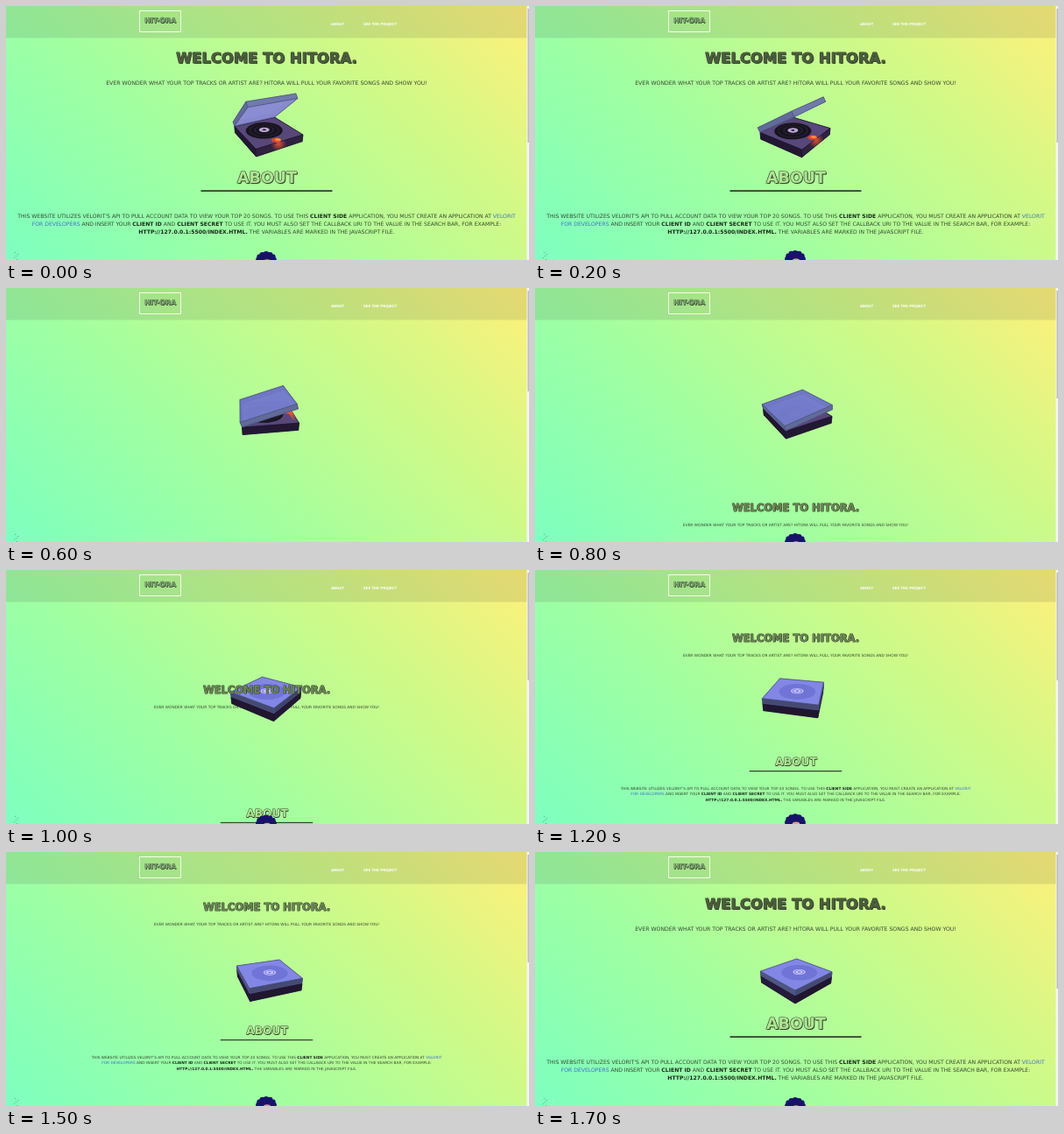
Recreate the animation shown at these times as an HTML page with a canvas. Size 597 px wide and 290 px high, loop 1.8 s.

```html
<!DOCTYPE html>
<html lang="en">
<head>
<meta charset="utf-8">
<title>Hitora</title>
<style>
html, body { margin: 0; width: 100%; height: 100%; overflow: hidden; }
canvas { display: block; }
</style>
</head>
<body>
<canvas id="stage" width="597" height="290"></canvas>
<script>
const ctx = document.getElementById('stage').getContext('2d');
const LOOP = 1800, STEP = 100, MID = 297.5, INK = '#34482f';
const FONT = '"DejaVu Sans", sans-serif';
const HALF = 28.5, BASE_TOP = 0, SIN_PITCH = 0.45, COS_PITCH = 0.89;
const RAD = Math.PI / 180;

const INTRO = 'EVER WONDER WHAT YOUR TOP TRACKS OR ARTIST ARE? HITORA WILL PULL YOUR FAVORITE SONGS AND SHOW YOU!';
// *bold* and _link_ runs
const ABOUT = [
  "THIS WEBSITE UTILIZES VELORIT'S API TO PULL ACCOUNT DATA TO VIEW YOUR TOP 20 SONGS. TO USE THIS *CLIENT SIDE* APPLICATION, YOU MUST CREATE AN APPLICATION AT _VELORIT_",
  '_FOR DEVELOPERS_ AND INSERT YOUR *CLIENT ID* AND *CLIENT SECRET* TO USE IT. YOU MUST ALSO SET THE CALLBACK URI TO THE VALUE IN THE SEARCH BAR, FOR EXAMPLE:',
  '*HTTP://127.0.0.1:5500/INDEX.HTML.* THE VARIABLES ARE MARKED IN THE JAVASCRIPT FILE.'
];

const sky = ctx.createLinearGradient(77, 367, 520, -77);
[[0, '#7dffc0'], [0.35, '#a1ffa1'], [0.7, '#d0f988'], [1, '#fff07a']]
  .forEach(stop => sky.addColorStop(...stop));

function rect(x, y, w, h, fill) {
  ctx.fillStyle = fill;
  ctx.fillRect(x, y, w, h);
}

function richLine(line, y, size) {
  const runs = line.split(/(\*[^*]+\*|_[^_]+_)/).filter(Boolean).map(run => {
    const bold = run[0] === '*', link = run[0] === '_';
    const font = `${bold ? 'bold ' : ''}${size}px ${FONT}`;
    const text = run.replace(/[*_]/g, '');
    ctx.font = font;
    return { text, font, color: link ? '#3f70d0' : bold ? '#1a261a' : INK, width: ctx.measureText(text).width };
  });
  let x = MID - runs.reduce((sum, run) => sum + run.width, 0) / 2;
  ctx.textAlign = 'left';
  for (const run of runs) {
    ctx.font = run.font;
    ctx.fillStyle = run.color;
    ctx.fillText(run.text, x, y);
    x += run.width;
  }
}

function shaded(text, x, y, size, face) {
  const base = y + size * 0.07;
  ctx.font = `bold ${size}px ${FONT}`;
  ctx.textAlign = 'center';
  ctx.lineJoin = 'round';
  ctx.fillStyle = ctx.strokeStyle = '#37432f';
  ctx.lineWidth = size * 0.07;
  ctx.fillText(text, x + size * 0.05, base + size * 0.05);
  ctx.strokeText(text, x, base);
  ctx.fillStyle = face;
  ctx.fillText(text, x, base);
}

function polygon(points, fill, stroke) {
  ctx.beginPath();
  points.forEach(([x, y]) => ctx.lineTo(x, y));
  ctx.closePath();
  ctx.fillStyle = fill;
  ctx.fill();
  if (!stroke) return;
  ctx.strokeStyle = stroke;
  ctx.lineWidth = 0.6;
  ctx.stroke();
}

function turntable(t) {
  const yaw = (150 - 0.114 * t) * RAD;
  const open = Math.max(0, 40 - 0.04 * t) * RAD;

  const project = (x, y, z) => {
    const side = x * Math.cos(yaw) - z * Math.sin(yaw);
    const depth = x * Math.sin(yaw) + z * Math.cos(yaw);
    const near = depth * COS_PITCH + y * SIN_PITCH;
    const k = 190 / (190 - near);
    return [298 + side * k, 142 + (depth * SIN_PITCH - y * COS_PITCH) * k, near];
  };
  // The lid swings about the edge z = HALF.
  const lid = (x, h, z) => {
    const reach = HALF - z;
    return project(x,
      BASE_TOP + reach * Math.sin(open) + h * Math.cos(open),
      HALF - reach * Math.cos(open) + h * Math.sin(open));
  };
  const box = (map, low, high, colors, edge) => {
    const corner = i => map(i & 1 ? HALF : -HALF, i & 2 ? high : low, i & 4 ? HALF : -HALF);
    // bottom, top, then the four sides
    [[0, 1, 5, 4], [2, 3, 7, 6], [0, 1, 3, 2], [4, 5, 7, 6], [0, 2, 6, 4], [1, 3, 7, 5]]
      .map((face, i) => {
        const points = face.map(corner);
        return { points, color: colors[i], near: points.reduce((sum, p) => sum + p[2], 0) };
      })
      .sort((a, b) => a.near - b.near)
      .forEach(face => polygon(face.points, face.color, edge));
  };
  const disc = (map, x, y, z, r, fill) => polygon(
    Array.from({ length: 40 }, (_, i) => map(x + r * Math.cos(i * 9 * RAD), y, z + r * Math.sin(i * 9 * RAD))), fill);

  box(project, -8.5, BASE_TOP, ['#1b1430', '#574879', '#30223f', '#21162f', '#251a3b', '#221833'], '#1d1530');
  [[21, '#17131f'], [17, '#2d2936'], [16, '#17131f'], [11, '#34303d'], [10, '#17131f'], [6, '#b9a6cf'], [2, '#221a2c']]
    .forEach(([r, fill]) => disc(project, 2, BASE_TOP, 3, r, fill));
  if (open) {
    disc(project, 3, BASE_TOP, -24, 5, '#d9472f');
    disc(project, 1, BASE_TOP, -24, 3, '#ff8a3c');
    const [x, y] = project(3, -2, -HALF);
    const glow = ctx.createRadialGradient(x, y, 0, x, y, 9);
    glow.addColorStop(0, 'rgba(255,95,45,.8)');
    glow.addColorStop(1, 'rgba(255,95,45,0)');
    const front = [[-HALF, -8.5], [HALF, -8.5], [HALF, BASE_TOP], [-HALF, BASE_TOP]];
    polygon(front.map(([px, py]) => project(px, py, -HALF)), glow);
  }
  const glass = open
    ? ['rgba(142,142,214,.88)', 'rgba(112,122,202,.86)', '#6f7bab', '#5a638c', '#68739f', '#616b98']
    : ['#53588a', '#8287e6', '#4d5479', '#444a70', '#50577f', '#3e4468'];
  box(lid, 0.5, 6, glass, '#4a5080');
  if (!open) {
    [[20, '#7074d6'], [7, '#c6c2ff'], [5.5, '#7c7fe0'], [4, '#d2ccff'], [2, '#7c7fe0']]
      .forEach(([r, fill]) => disc(lid, 2, 6, 3, r, fill));
  }
}

function mascot(t) {
  const y = 289 - Math.cos((t - 400) / 900 * 2 * Math.PI);
  ctx.fillStyle = '#17136b';
  ctx.beginPath();
  for (let i = 0; i < 12; i++) {
    const a = i * 30 * RAD;
    ctx.moveTo(297, y);
    ctx.arc(297 + 8.5 * Math.cos(a), y + 6.5 * Math.sin(a), 3.4, 0, 7);
  }
  ctx.ellipse(297, y, 9, 8, 0, 0, 7);
  ctx.fill();
  ctx.fillStyle = '#e2a08c';
  ctx.beginPath();
  ctx.ellipse(298, y + 2.5, 4.5, 3.2, 0, 0, 7);
  ctx.fill();
}

function header() {
  rect(0, 0, 597, 36.5, 'rgba(60,60,60,.13)');
  ctx.strokeStyle = '#f4ffe4';
  ctx.lineWidth = 1;
  ctx.strokeRect(152.5, 5.5, 47, 24);
  shaded('HIT-ORA', 176.3, 16.8, 7.9, '#7fa974');
  ctx.font = `bold 3.9px ${FONT}`;
  ctx.fillStyle = '#fff';
  ctx.fillText('ABOUT', 378.5, 20.6);
  ctx.fillText('SEE THE PROJECT', 427, 20.6);
}

function draw(t) {
  const small = t >= 600 && t < 1600;
  const scale = small ? 0.703 : 1;
  const slide = small ? 15 * Math.pow(Math.max(0, 1400 - t) / 200, 2.3) : 0;
  const titleY = (small ? 63 : 60) + slide;
  const aboutY = (small ? 204 : 196) + slide;

  ctx.textBaseline = 'middle';
  rect(0, 0, 597, 290, sky);
  richLine(INTRO, titleY + 28 * scale, 6.18 * scale);
  shaded('ABOUT', MID + 0.5, aboutY, 17.5 * scale, '#aee592');
  rect(MID - 75 * scale, aboutY + 14.2 * scale, 150 * scale, 1.8 * scale, '#34452f');
  ABOUT.forEach((line, i) => richLine(line, aboutY + (44 + 9 * i) * scale, 6.12 * scale));
  turntable(t);
  shaded('WELCOME TO HITORA.', MID, titleY, 16.4 * scale, small ? '#6a8454' : '#4c5d3d');
  if (t < 600 || t >= 800) mascot(t);
  header();

  for (let i = 0; i < 11; i++) {
    rect(6 + i * 37 % 15, 280 + i * 23 % 10, 1, 1, i % 2 ? '#55b98c' : '#b9ffe0');
  }
  rect(594.5, 0, 2.5, 290, '#f5f5f5');
  rect(595.5, 3, 1.5, (!small ? 156 : t < 800 ? 118 : 126) - 3, '#bcbcbc');
}

function frame() {
  const t = performance.now() % LOOP;
  draw(Math.floor(t / STEP) * STEP);
  requestAnimationFrame(frame);
}
frame();
</script>
</body>
</html>
```
